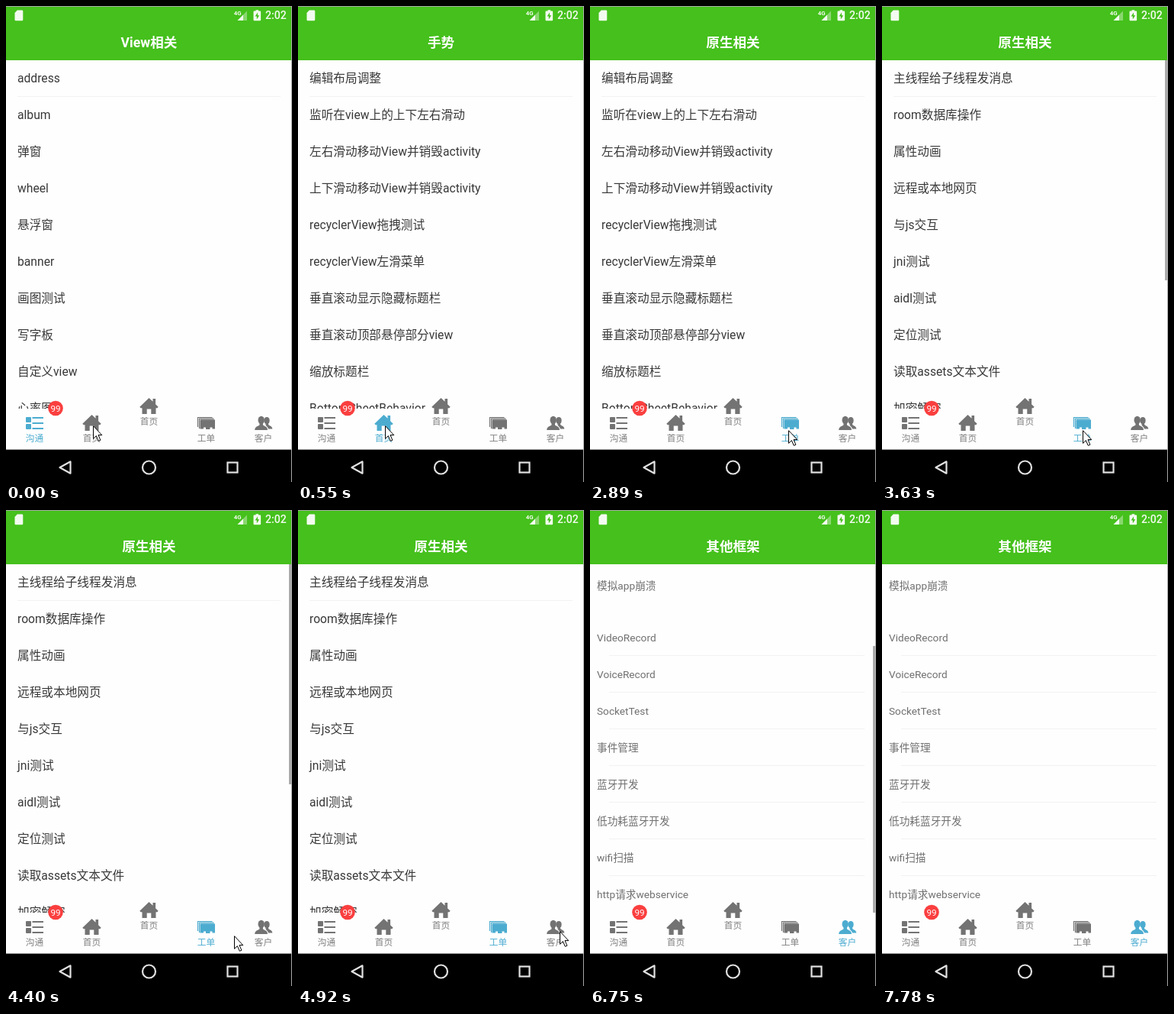
Write an HTML page that moves like this. It is 375 px wide and 623 px high and loops after 8 s.

```html
<!DOCTYPE html>
<html lang="zh-CN">
<head>
<meta charset="utf-8">
<title>Tab bar demo</title>
<style>
  html, body { margin: 0; width: 100%; height: 100%; overflow: hidden; background: #fefefe; }
  svg { display: block; width: 375px; height: 623px; }
  text { font-family: Roboto, "Noto Sans CJK SC", "Noto Sans CJK", sans-serif; }
  .title { font-size: 17.6px; font-weight: 700; fill: #fff; text-anchor: middle; }
  .row { font-size: 15.68px; fill: #383838; }
  .small { font-size: 13.68px; fill: #707070; }
  .label { font-size: 11.72px; text-anchor: middle; }
  .tab { fill: #737373; color: #737373; }
  .tab .label { fill: #808080; }
  .tab.on, .tab.on .label { fill: #4cacd0; color: #4cacd0; }
  .line { fill: #f2f2f2; }
  .bar { fill: #aaa; }
</style>
</head>
<body>
<svg viewBox="0 0 375 623">
  <defs>
    <clipPath id="listArea"><rect y="71" width="375" height="456"/></clipPath>
    <!-- tab icons are centred on 0,0 -->
    <g id="list">
      <rect x="-11.5" y="-8" width="7" height="7" rx="1"/>
      <rect x="-11.5" y="1" width="7" height="7" rx="1"/>
      <path d="M-3-8H11.5v2H-3zM-3-1H11.5v2H-3zM-3 6H11.5v2H-3z"/>
    </g>
    <path id="house" d="M0-11L5-6.2V-10H8.6V-2.8L12.2 .8 10.8 2.2H9V10H2.8V3.6H-2.8V10H-9V2.2H-10.8L-12.2 .8Z"/>
    <g id="cards">
      <path d="M-11 5V-7.5H8M-9 7V-5.8H10" fill="none" stroke="currentColor" stroke-width="1.2"/>
      <path d="M-7-4.800H10.500a1 1 0 0 1 1 1V7.500H8V5.500H5V8H-.5V5.500H-3.500V7.500H-8V-3.800a1 1 0 0 1 1-1z"/>
    </g>
    <g id="people">
      <ellipse cx="4.500" cy="-3.500" rx="3.600" ry="4.500"/>
      <path d="M3-1H6.500V1.500C7 3.500 11.800 3.500 11.800 7.500H6.500C6.200 4.500 3 4 3 2z"/>
      <ellipse cx="-2.800" cy="-4" rx="4.200" ry="5.200"/>
      <path d="M-5-1H-.6V2C0 4.200 5.500 3.800 5.500 9H-11.300C-11.300 3.800-5.600 4.200-5 2z"/>
    </g>
  </defs>

  <rect width="375" height="623" fill="#fefefe"/>
  <rect width="375" height="71" fill="#45c01c"/>
  <text class="title" id="title" x="187.500" y="54"/>

  <!-- status bar -->
  <g fill="#f3fbf0">
    <path d="M14.800 5.500H21a1.300 1.300 0 0 1 1.300 1.300V18a1.300 1.300 0 0 1-1.300 1.300H12.800A1.300 1.300 0 0 1 11.500 18V9z"/>
    <text x="298.700" y="12" font-size="7.800" font-weight="700">4G</text>
    <path d="M316 6.500V19H303.500z" opacity=".4"/>
    <path d="M311 11.500V19H303.500z"/>
    <path d="M327.500 6.500V5.200h3.600V6.500h2a1 1 0 0 1 1 1V18.300a1 1 0 0 1-1 1H325.500a1 1 0 0 1-1-1V7.500a1 1 0 0 1 1-1z"/>
    <path d="M330 8.500L326.600 13.600H328.800V17.500L332.200 12.200H330z" fill="#45c01c"/>
    <text x="340" y="17" font-size="14" font-weight="500">2:02</text>
  </g>

  <g id="pages" clip-path="url(#listArea)"></g>
  <g id="tabs"></g>

  <circle cx="65" cy="526.500" r="9.800" fill="#fa3f3f"/>
  <text class="label" x="65" y="530.700" fill="#fff">99</text>

  <!-- navigation bar -->
  <rect y="580.600" width="375" height="43"/>
  <g fill="none" stroke="#e2e2e2" stroke-width="2.200">
    <path d="M70.500 604L84.500 596.300V611.700z" stroke-linejoin="round"/>
    <circle cx="187.500" cy="604" r="8.500"/>
    <rect x="290.500" y="597.500" width="13" height="13"/>
  </g>
  <path d="M0 .5H375M374.500 0V623" stroke="#a6a6a6" fill="none"/>

  <path id="cursor" d="M.5 .7V17.300L4.400 13.600 7.300 20.300 9.900 19.200 7 12.600H11.800Z" fill="#fff" stroke="#000"/>
</svg>

<script>
const LOOP = 8000;
const NS = "http://www.w3.org/2000/svg";
const $ = id => document.getElementById(id);

function add(parent, tag, attrs, text) {
  const el = document.createElementNS(NS, tag);
  for (const k in attrs) el.setAttribute(k, attrs[k]);
  if (text) el.textContent = text;
  return parent.appendChild(el);
}

const tabs = [
  ["list", "沟通"], ["house", "首页"], ["house", "首页"], ["cards", "工单"], ["people", "客户"]
].map(([icon, label], i) => {
  const y = i === 2 ? 524 : 546;
  const g = add($("tabs"), "g", { class: "tab", transform: `translate(${37.5 + 75 * i} ${y})` });
  add(g, "use", { href: "#" + icon });
  add(g, "text", { class: "label", y: 24 }, label);
  return g;
});

// bar: scrollbar extent and the time its fade begins
const pages = [
  { rows: "address,album,弹窗,wheel,悬浮窗,banner,画图测试,写字板,自定义view,心率图" },
  { rows: "编辑布局调整,监听在view上的上下左右滑动,左右滑动移动View并销毁activity," +
      "上下滑动移动View并销毁activity,recyclerView拖拽测试,recyclerView左滑菜单," +
      "垂直滚动显示隐藏标题栏,垂直滚动顶部悬停部分view,缩放标题栏,BottomSheetBehavior" },
  { rows: "主线程给子线程发消息,room数据库操作,属性动画,远程或本地网页,与js交互," +
      "jni测试,aidl测试,定位测试,读取assets文本文件,加密解密", bar: [71, 359, 4460] },
  { rows: "模拟app崩溃,VideoRecord,VoiceRecord,SocketTest,事件管理,蓝牙开发," +
      "低功耗蓝牙开发,wifi扫描,http请求webservice", bar: [178, 527, 7550], small: true }
];

for (const p of pages) {
  p.el = add($("pages"), "g", {});
  p.rows.split(",").forEach((row, i) => {
    const y = p.small ? (i ? 124 + 48 * i : 104) : 100 + 48 * i;
    add(p.el, "text", { class: p.small ? "small" : "row", x: p.small ? 9 : 15, y }, row);
    if (p.small && i > 1) add(p.el, "rect", { class: "line", x: 25, y: 94 + 48 * i, width: 335, height: 1 });
  });
  if (!p.small) add(p.el, "rect", { class: "line", x: 15, y: 118, width: 345, height: 1 });
  if (p.bar) {
    const [top, bottom] = p.bar;
    p.thumb = add(p.el, "rect", { class: "bar", x: 371, y: top, width: 3, height: bottom - top });
  }
}

// the header and tab switch first, the list follows
const states = [
  { title: "View相关", tab: 0, at: 0, listAt: 0 },
  { title: "手势", tab: 1, at: 500, listAt: 550 },
  { title: "原生相关", tab: 3, at: 2890, listAt: 2950 },
  { title: "其他框架", tab: 4, at: 5910, listAt: 6040 }
];

const easeIn = p => u => Math.pow(u, p);
const easeOut = p => u => 1 - Math.pow(1 - u, p);
const linear = u => u;

// first step, last step, step count, end point, easing of x and y
const start = [114, 549];
const moves = [
  [1050, 1840, 15, [245, 555], easeOut(1.9), easeOut(3)],
  [1900, 2150, 5, [260, 555], easeOut(1.9), linear],
  [3630, 4160, 9, [290, 557], linear, linear],
  [4340, 4980, 12, [355, 549], easeIn(1.1), easeIn(2)],
  [6400, 6750, 7, [320, 630], linear, linear]
];

function cursorAt(t) {
  let [x, y] = start;
  for (const [from, to, n, end, easeX, easeY] of moves) {
    if (t < from) break;
    const step = Math.floor((t - from) / (to - from) * (n - 1) + 1e-6) + 1;
    const u = Math.min(step, n) / n;
    x += (end[0] - x) * easeX(u);
    y += (end[1] - y) * easeY(u);
  }
  return [Math.round(x), Math.round(y)];
}

function fade(t, from) {
  if (t < from) return 1;
  return Math.max(0, 2 - Math.floor((t - from) / 115)) / 3;
}

const latest = (t, key) => states.filter(s => t >= s[key]).length - 1;

function draw(t) {
  const state = states[latest(t, "at")];
  const page = latest(t, "listAt");
  $("title").textContent = state.title;
  tabs.forEach((tab, i) => tab.classList.toggle("on", i === state.tab));
  pages.forEach((p, i) => {
    p.el.style.display = i === page ? "" : "none";
    if (p.thumb) p.thumb.style.opacity = fade(t, p.bar[2]);
  });
  const [x, y] = cursorAt(t);
  $("cursor").setAttribute("transform", `translate(${x} ${y})`);
  $("cursor").style.display = t >= 6750 ? "none" : "";
}

const t0 = performance.now();
function tick() {
  draw((performance.now() - t0) % LOOP);
  requestAnimationFrame(tick);
}
draw(0);
requestAnimationFrame(tick);
</script>
</body>
</html>
```
